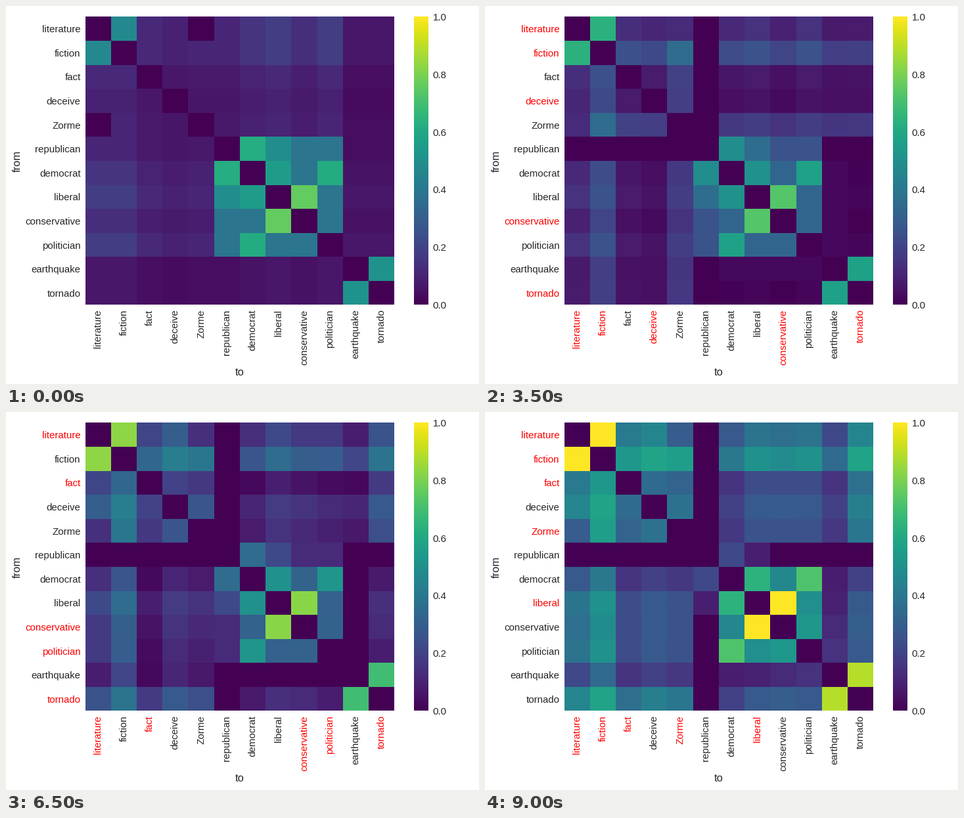
These frames come from a looping animation (720x576 px, 9.5 s). A matplotlib script:

```python
import numpy as np
import matplotlib.pyplot as plt
from matplotlib.animation import FuncAnimation

# Each word with its general affinity to the others.
AFFINITY = {"literature": .42, "fiction": .42, "fact": .27, "deceive": .22,
            "Zorme": .25, "republican": .25, "democrat": .36, "liberal": .42,
            "conservative": .31, "politician": .42, "earthquake": .14,
            "tornado": .14}
WORDS = list(AFFINITY)
N = len(WORDS)
FADING = WORDS.index("republican")
POLITICS = slice(FADING, FADING + 5)

# Pairs that stand out at the start.
BONDS = {("literature", "fiction"): .47, ("literature", "Zorme"): 0,
         ("republican", "democrat"): .62, ("republican", "liberal"): .49,
         ("democrat", "liberal"): .55, ("democrat", "politician"): .61,
         ("liberal", "conservative"): .76, ("earthquake", "tornado"): .51}

# Words trained in each step.
ACTIVE = [(), (1, 4, 11), (0, 1, 2, 3, 4), (1, 4, 10), (0, 1, 3, 8, 11),
          (3, 7, 11), (0, 1, 2, 3, 11), (0, 2, 8, 9, 11), (1, 9),
          (0, 1, 2, 4, 7)]


def first_state():
    a = np.array(list(AFFINITY.values()))
    m = np.outer(a, a)
    m[POLITICS, POLITICS] = .39
    for (p, q), value in BONDS.items():
        i, j = WORDS.index(p), WORDS.index(q)
        m[i, j] = m[j, i] = value
    np.fill_diagonal(m, 0)
    return m


def train(m, step):
    """Active words gain, weak pairs decay, and everything rises late on."""
    active = np.isin(np.arange(N), ACTIVE[step])
    gain = np.interp(step, [6, 9], [.055, .01])
    rise = .03 * max(step - 6, 0)
    change = gain * np.add.outer(active, active, dtype=float)
    change += rise - .035 * (1 - m)
    change[FADING] = change[:, FADING] = -.045
    m = np.clip(m + change, 0, 1)
    np.fill_diagonal(m, 0)
    return m


states = [first_state()]
for step in range(1, len(ACTIVE)):
    states.append(train(states[-1], step))

W, H, DPI = 720, 576, 72
INK, RED = "0.15", "red"
TOP, BOTTOM = 16.49, 455.49
plt.rcParams.update({"font.family": "Liberation Sans", "font.size": 15,
                     "axes.labelsize": 16.5, "axes.labelcolor": INK,
                     "xtick.color": INK, "ytick.color": INK})
fig = plt.figure(figsize=(W / DPI, H / DPI), dpi=DPI, facecolor="white")


def panel(left, right):
    ax = fig.add_axes([left / W, 1 - BOTTOM / H,
                       (right - left) / W, (BOTTOM - TOP) / H])
    ax.spines[:].set_visible(False)
    ax.tick_params(length=0, pad=7)
    return ax


ax = panel(120.51, 591.45)
mesh = ax.pcolormesh(states[0], cmap="viridis", vmin=0, vmax=1)
ax.invert_yaxis()
centers = np.arange(N) + 0.5
ax.set_xticks(centers, WORDS, rotation=90)
ax.set_yticks(centers, WORDS)
ax.set_xlabel("to")
ax.set_ylabel("from")

bar = panel(620.9, 642.85)
bar.imshow(np.linspace(0, 1, 256)[:, None], cmap="viridis", origin="lower",
           extent=(0, 1, 0, 1), aspect="auto")
bar.set_xticks([])
bar.yaxis.tick_right()
levels = np.linspace(0, 1, 6)
bar.set_yticks(levels, [f"{v:.1f}" for v in levels])
bar.tick_params(length=0, pad=7)


def update(i):
    # Words light up first, their similarities move one frame later.
    mesh.set_array(states[i // 2])
    active = ACTIVE[(i + 1) // 2]
    for axis in (ax.xaxis, ax.yaxis):
        for j, label in enumerate(axis.get_ticklabels()):
            label.set_color(RED if j in active else INK)
    return [mesh]


anim = FuncAnimation(fig, update, frames=19, interval=500, repeat=True,
                     repeat_delay=0)
plt.show()
```
